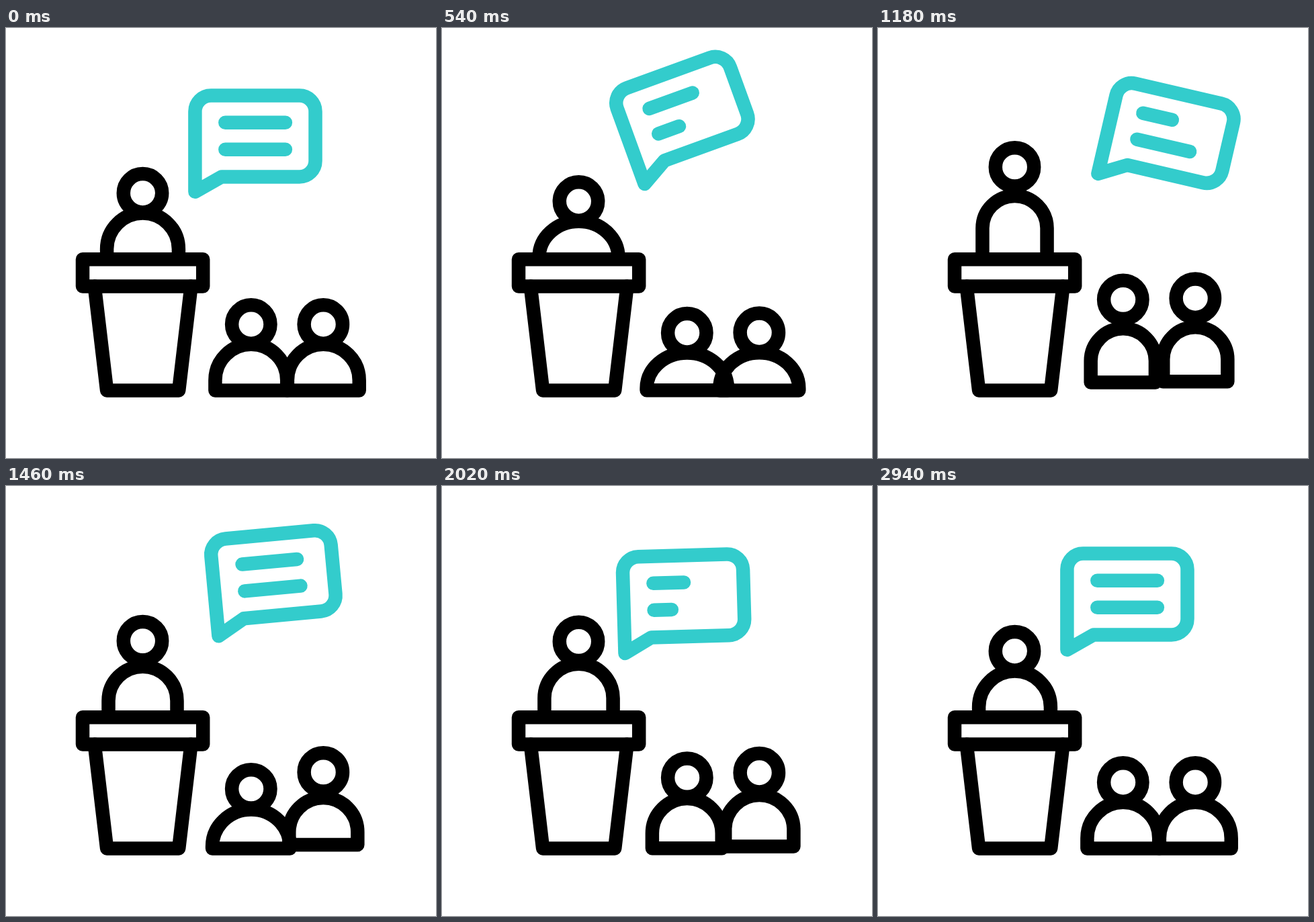
Animation of 640x640 px, one loop 3600 ms. Source, as an HTML page:

```html
<!DOCTYPE html>
<html lang="en">
<head>
<meta charset="utf-8">
<title>Speaker and audience</title>
<style>
  html, body { margin: 0; width: 100%; height: 100%; overflow: hidden; background: #fff; }
  svg { display: block; width: 100%; height: 100%; }
  g { fill: none; stroke: #000; stroke-width: 20.5; stroke-linecap: round; stroke-linejoin: round; }
  #bubble { stroke: #33cccc; }
  .open { stroke-linecap: butt; }
</style>
</head>
<body>
<svg viewBox="0 0 640 640">
  <g>
    <g id="speaker"><circle r="28.7"/><path class="open"/></g>
    <path d="M114 344.3H293.2V384.6H114Z"/>
    <path d="M131.8 384.6L150.1 539.4H257.2L275.5 384.6"/>
    <g id="right"><circle r="28.7"/><path/></g>
    <g id="left"><circle r="28.7"/><path/></g>
  </g>
  <g id="bubble">
    <path d="M281.4 243.8L321 221.4H436.8A23.7 23.7 0 0 0 460.5 197.7V124.3A23.7 23.7 0 0 0 436.8 100.6H305.1A23.7 23.7 0 0 0 281.4 124.3Z"/>
    <path id="line1"/>
    <path id="line2"/>
  </g>
</svg>
<script>
const LOOP = 3600;
const LAG = 150;
const TIP = "281.4 243.8";
const $ = id => document.getElementById(id);

// Eased step from 0 to 1 between two times.
function ramp(t, from, to) {
  const s = Math.min(Math.max((t - from) / (to - from), 0), 1);
  return s * s * (3 - 2 * s);
}

// Positive is squashed, negative is stretched: crouch, jump, land, rebound, settle.
const squash = t =>
  14 * ramp(t, 0, 500) - 39.5 * ramp(t, 500, 880) + 37 * ramp(t, 1130, 1490)
  - 22.5 * ramp(t, 1490, 1830) + 13.5 * ramp(t, 1830, 2280) - 2.5 * ramp(t, 2280, 2550);

// Height of the feet: one jump and a small second hop.
const lift = t =>
  13.3 * (ramp(t, 520, 850) - ramp(t, 1110, 1470)) + 4 * (ramp(t, 1540, 1760) - ramp(t, 1760, 2080));

function drawPerson(id, x, headY, t, seated) {
  const [head, body] = $(id).children;
  const width = squash(t - 30);
  const half = 53.4 + width * (width > 0 ? 0.49 : 0.21);
  const top = headY + 29.8 + squash(t);
  const base = headY + 98.5 - (seated ? lift(t) : 0);
  const ry = Math.min(half, base - top - 3);
  head.setAttribute("cx", x);
  head.setAttribute("cy", headY + squash(t) - lift(t - 50));
  body.setAttribute("d",
    `M${x - half} ${base}V${top + ry}A${half} ${ry} 0 0 1 ${x + half} ${top + ry}V${base}` + (seated ? "Z" : ""));
}

// Each text line shrinks and regrows twice.
function drawLine(id, y, t) {
  const phase = Math.min(Math.max(t / 660, 0), 4) % 2;
  const length = 89.6 - 63.6 * (ramp(phase, 0, 1) - ramp(phase, 1, 2));
  $(id).setAttribute("d", `M326.3 ${y}h${length}`);
}

function drawBubble(t) {
  const x = 46 * ramp(t, 0, 1180) - 60.5 * ramp(t, 1180, 2215) + 14.5 * ramp(t, 2215, 2880);
  const angle = -20 * ramp(t, 0, 540) + 40 * ramp(t, 540, 982)
    - 30 * ramp(t, 982, 1620) + 10 * ramp(t, 1620, 2160);
  $("bubble").setAttribute("transform", `translate(${x} ${-0.585 * x}) rotate(${angle} ${TIP})`);
  drawLine("line1", 140.8, t - 285);
  drawLine("line2", 180.8, t - 15);
}

function draw(t) {
  drawPerson("left", 364.8, 441, t, true);
  drawPerson("right", 472.3, 441, t - LAG, true);
  drawPerson("speaker", 203.5, 245.7, t - LAG, false);
  drawBubble(t);
}

const start = performance.now();
function tick() {
  draw((performance.now() - start) % LOOP);
  requestAnimationFrame(tick);
}
tick();
</script>
</body>
</html>
```
